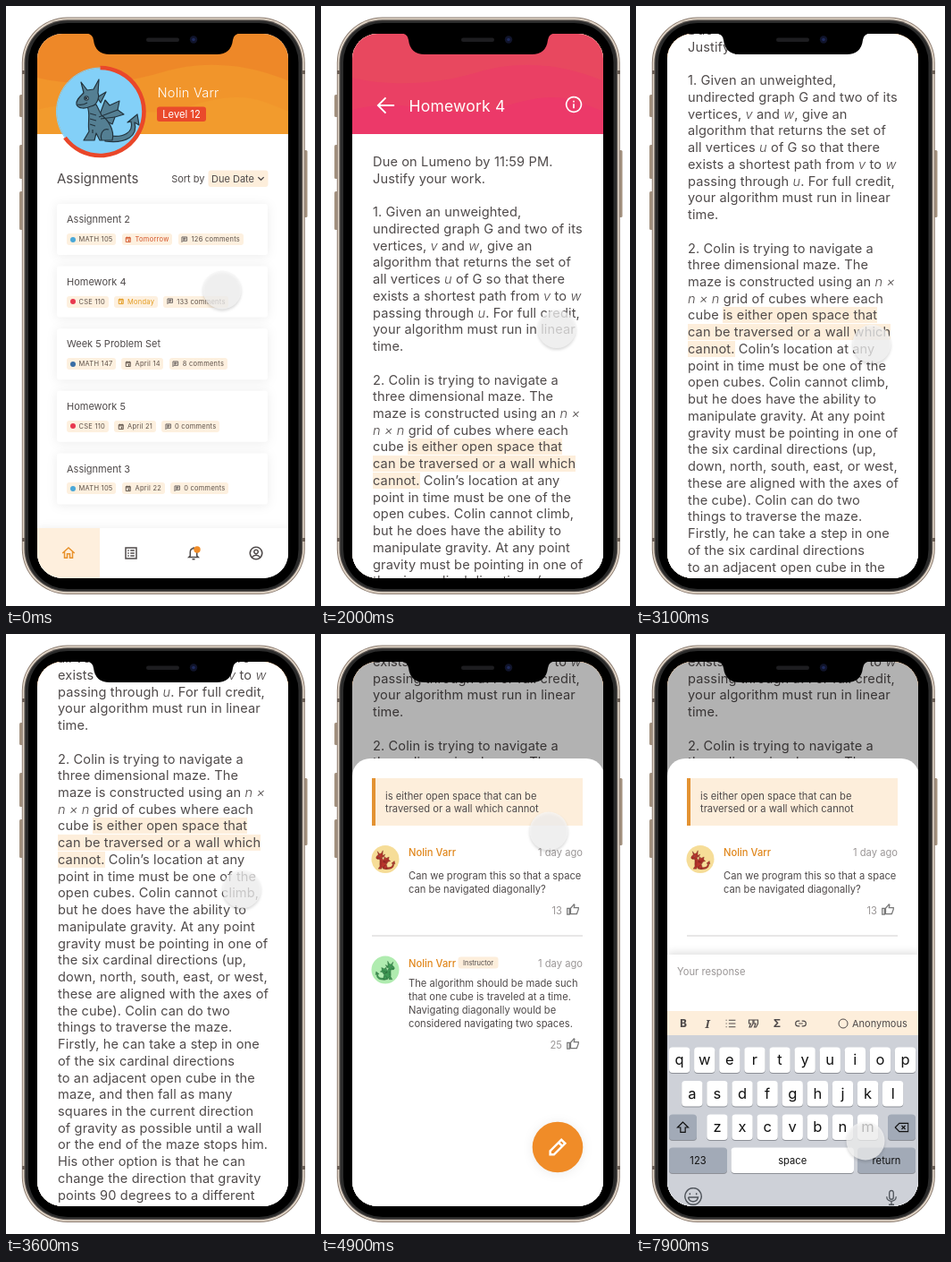
Recreate the animation shown at these times as an HTML page. Size 346x670 px, loop 8000 ms.

```html
<!DOCTYPE html>
<html lang="en">
<head>
<meta charset="utf-8">
<title>Assignments app</title>
<style>
html, body { margin: 0; width: 100%; height: 100%; overflow: hidden; background: #fff; }
body, text { font-family: Inter, Roboto, sans-serif; }
#stage { position: relative; width: 346px; height: 670px; overflow: hidden; }
#stage > *, #screen > *, .art { position: absolute; left: 0; top: 0; width: 346px; height: 670px; }
#screen { clip-path: inset(31px 30px 31px 35px round 28px); background: #fff; }
#page { background: #fff; clip-path: inset(0 0 0 35px); }
#scroll { position: absolute; left: 0; top: 0; }
#body { position: absolute; left: 58px; top: 165px; margin: 0; white-space: pre; letter-spacing: .12px;
  font: 14.6px/18.73px Inter, Roboto, sans-serif; color: #4f4a4a; }
#body i { font-weight: 300; }
#body mark { background: #fdeedb; color: inherit; }
#dim { background: #000; }
.chips { position: absolute; left: 68px; display: flex; gap: 6.5px; }
.chips span { display: flex; align-items: center; gap: 4px; height: 13px; padding: 0 3.5px;
  border-radius: 3px; background: #fdf0df; font-size: 7.5px; letter-spacing: .25px; color: #5c5048; white-space: pre; }
.card { filter: drop-shadow(0 1px 6px #00000014); }
#composer .sheet { filter: drop-shadow(0 -2px 5px #0002); }
#cursor { overflow: visible; filter: drop-shadow(0 2px 1.5px #0003); }
</style>
</head>
<body>
<div id="stage">
  <svg id="phone"></svg>
  <div id="screen">
    <div id="home"></div>
    <div id="page"><div id="scroll">
      <svg id="banner" class="art"></svg>
      <pre id="body">Due on Lumeno by 11:59 PM.
Justify your work.

1. Given an unweighted,
undirected graph G and two of its
vertices, <i>v</i> and <i>w</i>, give an
algorithm that returns the set of
all vertices <i>u</i> of G so that there
exists a shortest path from <i>v</i> to <i>w</i>
passing through <i>u</i>. For full credit,
your algorithm must run in linear
time.

2. Colin is trying to navigate a
three dimensional maze. The
maze is constructed using an <i>n ×</i>
<i>n × n</i> grid of cubes where each
cube <mark>is either open space that</mark>
<mark>can be traversed or a wall which</mark>
<mark>cannot.</mark> Colin’s location at any
point in time must be one of the
open cubes. Colin cannot climb,
but he does have the ability to
manipulate gravity. At any point
gravity must be pointing in one of
the six cardinal directions (up,
down, north, south, east, or west,
these are aligned with the axes of
the cube). Colin can do two
things to traverse the maze.
Firstly, he can take a step in one
of the six cardinal directions
to an adjacent open cube in the
maze, and then fall as many
squares in the current direction
of gravity as possible until a wall
or the end of the maze stops him.
His other option is that he can
change the direction that gravity
points 90 degrees to a different
cardinal direction.</pre>
    </div></div>
    <div id="dim"></div>
    <svg id="sheet"></svg>
    <svg id="composer"></svg>
    <svg id="cursor"><circle r="21.5" fill="#f6f6f6" fill-opacity=".74"/></svg>
  </div>
  <svg id="notch"></svg>
</div>
<script>
const $ = id => document.getElementById(id);
const INK = '#4f4a4a', CREAM = '#fdeedb', ORANGE = '#f08c28', GRAY = '#9b9797';
const USER = 'Nolin Varr';

const text = (x, y, s, size = 11.2, fill = INK, extra = '') =>
  `<text x="${x}" y="${y}" dy=".36em" font-size="${size}" fill="${fill}" ${extra}>${s}</text>`;
const rect = (x, y, w, h, fill, r = 0, extra = '') =>
  `<rect x="${x}" y="${y}" width="${w}" height="${h}" fill="${fill}" rx="${r}" ${extra}/>`;
const disc = (x, y, r, fill, extra = '') => `<circle cx="${x}" cy="${y}" r="${r}" fill="${fill}" ${extra}/>`;
const path = (d, fill, extra = '') => `<path d="${d}" fill="${fill}" ${extra}/>`;
const MID = 'text-anchor="middle"', END = 'text-anchor="end"';

// Line icons on a 24 unit grid
const ICONS = {
  home: 'M3 12L12 4L21 12M6 10V19H10V13H14V19H18V10',
  list: 'M4 4H20V20H4ZM7 8H9M11 8H17M7 12H9M11 12H17M7 16H9M11 16H17',
  bell: 'M5 18H19L17 16V11C17 3 7 3 7 11V16ZM10 21H14M12 3V5',
  user: 'M12 3A9 9 0 1 0 12.1 3M12 7A3 3 0 1 0 12.1 7M6 18C9 14 15 14 18 18',
  date: 'M4 5H20V21H4ZM4 9H20M8 2V5M16 2V5M13 14H16V17H13Z',
  chat: 'M3 3H21V17H7L3 21ZM7 7H17M7 10H17M7 13H14',
  down: 'M5 9L12 16L19 9',
  back: 'M22 12H3M12 3L3 12L12 21',
  info: 'M12 2A10 10 0 1 0 12.1 2M12 11V17M12 7V9',
  like: 'M2 10H6V21H2ZM8 10L14 3L15 4L14 9H22V12L19 20H8Z',
  pen: 'M4 20V16L16 4L20 8L8 20ZM13 7L17 11',
  bullets: 'M8 5H22M8 12H22M8 19H22M2 5H4M2 12H4M2 19H4',
  link: 'M10 7H7A5 5 0 0 0 7 17H10M14 7H17A5 5 0 0 1 17 17H14M8 12H16',
  shift: 'M12 3L3 12H8V20H16V12H21Z',
  erase: 'M8 5H23V19H8L1 12ZM12 9L18 15M18 9L12 15',
  smile: 'M12 2A10 10 0 1 0 12.1 2M6 13H18C17 20 7 20 6 13M8 8V10M16 8V10',
  mic: 'M12 2C8 2 9 6 9 12C9 16 15 16 15 12C15 6 16 2 12 2M5 11C5 20 19 20 19 11M12 18V23M8 23H16'
};
const icon = (name, x, y, size, color, w = 2) =>
  `<svg x="${x - size / 2}" y="${y - size / 2}" width="${size}" height="${size}" viewBox="0 0 24 24">` +
  path(ICONS[name], 'none', `stroke="${color}" stroke-width="${w}"`) + '</svg>';

const dragon = (x, y, scale, color, line, flip = 1) =>
  `<g transform="translate(${x} ${y}) scale(${scale * flip} ${scale}) translate(-36 -36)" stroke="${line}" stroke-width="1.2" stroke-linejoin="round">` +
  path('M34 64C56 69 66 60 63 49L59 50L70 41L72 53L67 50C71 65 58 74 34 71Z', color) +
  path('M27 44L34 25L39 31L50 26L48 36L55 41L45 44L42 52Z', color) +
  path('M14 32C18 40 14 50 16 60L10 70H22L24 62L28 70H42C45 58 37 47 30 42L24 30Z', color) +
  path('M17 40L24 42M17 46L24 48M17 52L23 54M20 58V62M30 70C28 62 32 56 38 58M27 44L48 36M29 46L45 44', 'none') +
  path('M25 22L35 16L29 28Z', color) +
  path('M2 30C1 25 6 21 10 17L7 5L14 14L21 13L27 2L26 17C28 22 25 31 18 32C12 35 4 35 2 30Z', color) +
  path('M3 30C8 31 11 30 14 28', 'none') +
  disc(13, 23, 2.2, '#fff') + disc(12.6, 23, .9, line) + '</g>';

const buttons = [[15, 99, 25], [15, 155, 38], [15, 207, 43], [333.5, 161, 75]];
$('phone').innerHTML =
  buttons.map(([x, y, h]) => rect(x, y, 4, h, '#a3917f', 1.5)).join('') +
  rect(17.8, 12.5, 317, 644.5, '#8c7c70', 51) + rect(18.8, 13.5, 315, 642.5, '#e2d6c8', 50) +
  rect(20.4, 15.2, 311.8, 639, '#5a5451', 48.5) + rect(21.6, 16.6, 309.4, 636.4, '#2b2b2b', 47) +
  rect(25, 19, 302.5, 632, '#000', 44) +
  [72, 594].map(y => rect(18, y, 3, 4, '#6b5f56') + rect(332, y, 3, 4, '#6b5f56')).join('');

$('notch').innerHTML =
  path('M90 30.5Q97 31 98 38Q100 54 116 54H236Q252 54 254 38Q255 31 262 30.5Z', '#000') +
  rect(157, 35.5, 37, 4.5, '#1d1d20', 2.2) + disc(210, 37.5, 4.2, '#10142b') + disc(210, 37.5, 1.8, '#1e2a5c');

const waves = (base, upper, lower) => rect(35, 30, 282, 113, base) +
  path('M35 80C75 90 130 88 175 74S270 64 317 84V143H35Z', upper) +
  path('M35 116C100 98 140 132 205 112S285 106 317 118V143H35Z', lower);

const cards = [
  ['Assignment 2', 'MATH 105', '#4aa8d8', 'Tomorrow', '#d4552a', 126],
  ['Homework 4', 'CSE 110', '#e8384f', 'Monday', '#e39a1c', 133],
  ['Week 5 Problem Set', 'MATH 147', '#3a6ea5', 'April 14', '#5c5048', 8],
  ['Homework 5', 'CSE 110', '#e8384f', 'April 21', '#5c5048', 0],
  ['Assignment 3', 'MATH 105', '#4aa8d8', 'April 22', '#5c5048', 0]
];
const cardY = i => 221 + i * 69.6;
const dot = c => `<svg width="6" height="6">${disc(3, 3, 3, c)}</svg>`;
$('home').innerHTML = '<svg class="art">' +
  waves('#ee8828', '#f1952b', '#f29b2d') +
  disc(105.5, 118, 48.5, '#83d0f8') +
  path('M105.5 69A49 49 0 1 1 66 147', 'none', 'stroke="#e9472a" stroke-width="4.6"') +
  path('M66 147A49 49 0 0 1 105.5 69', 'none', 'stroke="#83d0f8" stroke-width="1"') +
  dragon(113, 116, 1, '#547f93', '#23343e') +
  text(169.5, 96.5, USER, 14.6, '#fff', 'font-weight="300" letter-spacing=".2"') +
  rect(169, 112.5, 55, 16.5, '#ea4a2b', 3) + text(196.5, 121, 'Level 12', 11.2, '#fff', MID) +
  text(57, 193, 'Assignments', 15) + text(222.5, 193, 'Sort by', 11, INK, END) +
  rect(226.5, 183.5, 67, 18.5, CREAM, 3) + text(230, 193, 'Due Date', 11) + icon('down', 285.5, 192.5, 11, INK, 3) +
  cards.map((c, i) => rect(57, cardY(i), 236, 57, '#fff', 3, 'class="card"') + text(68, cardY(i) + 17.3, c[0], 11)).join('') +
  rect(35, 583, 282, 57, '#fff', 0, 'class="card"') + rect(35, 583, 70, 57, '#feefdd') +
  ['home', 'list', 'bell', 'user'].map((n, i) => icon(n, 70 + 70 * i, 611, 18, i ? INK : '#e8912a')).join('') +
  disc(214, 607, 3.7, ORANGE) + '</svg>' +
  cards.map(([, course, color, due, tint, n], i) => `<div class="chips" style="top:${cardY(i) + 33}px">` +
    `<span>${dot(color)}${course}</span>` +
    `<span style="color:${tint}">${icon('date', 0, 0, 7.5, tint, 3)}${due}</span>` +
    `<span>${icon('chat', 0, 0, 7.5, INK, 2.6)}${n} comments</span></div>`).join('');

$('banner').innerHTML = waves('#e8485f', '#ea4064', '#ec3969') +
  icon('back', 72.5, 111, 23, '#fff') + icon('info', 283, 110, 20, '#fff') +
  text(98.5, 111.5, 'Homework 4', 17.5, '#fff', 'letter-spacing=".2"');

const comment = (y, bg, color, line, flip, lines, textY, likes) =>
  disc(72, y + 7.5, 15.5, bg) + dragon(72, y + 8, .3, color, line, flip) +
  text(98, y, USER, 11.2, '#e0861a', 'font-weight="500"') + text(293, y, '1 day ago', 11.2, GRAY, END) +
  lines.map((s, i) => text(98, textY + 15 * i, s)).join('') +
  text(270, textY + 15 * lines.length + 8.5, likes, 11.2, GRAY, END) +
  icon('like', 282, textY + 15 * lines.length + 7.5, 15, '#777');

$('sheet').innerHTML = rect(35, 139, 282, 530, '#fff', 20) +
  rect(57, 161, 236, 53, CREAM) + rect(57, 161, 4, 53, '#e39232') +
  text(72, 180.5, 'is either open space that can be') + text(72, 195, 'traversed or a wall which cannot') +
  comment(244, '#f6dd98', '#b8352c', '#5a1714', 1,
    ['Can we program this so that a space', 'can be navigated diagonally?'], 270, 13) +
  rect(57, 336.5, 236, 1, '#d2d0d0') +
  comment(367.5, '#b0ecb0', '#3f9a55', '#1d4f2b', -1,
    ['The algorithm should be made such', 'that one cube is traveled at a time.',
      'Navigating diagonally would be', 'considered navigating two spaces.'], 390, 25) +
  rect(153.5, 360.5, 45, 13, CREAM, 3) + text(176, 367, 'Instructor', 7.5, INK, MID) +
  disc(265, 573, 28.3, ORANGE, 'class="card"') + icon('pen', 265, 573, 25, '#fff', 2.4);

const key = (x, y, w, label, fill = '#fff', size = 11.2) =>
  rect(x, y + 1, w, 28.5, '#8d9097', 4) + rect(x, y, w, 28.5, fill, 4) +
  text(x + w / 2, y + 14, label, size, '#111', MID);
const row = (letters, x, y) => [...letters].map((c, i) => key(x + 28.1 * i, y, 23.3, c, '#fff', 16.5)).join('');
const DARK = '#a2aab7';
$('composer').innerHTML = rect(35, 358, 282, 300, '#fff', 0, 'class="sheet"') +
  text(46, 376.5, 'Your response', 11.2, GRAY) + rect(35, 421, 282, 27, CREAM) +
  text(53, 435, 'B', 11.5, INK, MID + ' font-weight="800"') +
  text(80, 435, 'I', 12.5, INK, MID + ' font-weight="700" font-style="italic" style="font-family:Noto Serif,serif"') +
  icon('bullets', 106, 435, 13, INK) +
  [128.5, 134].map(x => path(`M${x - 2} 431h4.5v4l-2 4h-2l1.5-4h-2z`, 'none', `stroke="${INK}" stroke-width="1.2"`)).join('') +
  text(158, 435, 'Σ', 12, INK, MID + ' font-weight="700"') + icon('link', 184.5, 435, 14, INK) +
  disc(232, 435, 5, 'none', `stroke="${INK}"`) + text(242, 435, 'Anonymous', 11) +
  rect(35, 448, 282, 210, '#ced1d8') +
  row('qwertyuiop', 37, 461.5) + row('asdfghjkl', 51.2, 499) + row('zxcvbnm', 79.3, 536.5) +
  key(37, 536.5, 31, '', DARK) + icon('shift', 52.5, 551, 16, '#111', 1.8) +
  key(282, 536.5, 31, '', DARK) + icon('erase', 297.5, 551, 16, '#111', 1.8) +
  key(37, 573.5, 65, '123', DARK) + key(106.5, 573.5, 137.5, 'space') + key(248, 573.5, 65, 'return', DARK) +
  icon('smile', 64, 628, 22, '#50555c', 1.6) + icon('mic', 286, 629, 18, '#50555c', 1.8);

// Key points: [time, value, ...]
const scrollKeys = [[2320, 0], [2850, 147], [3200, 147], [3700, 293]];
const cursorKeys = [
  [0, 242, 317], [500, 263, 317], [1500, 263, 317], [2100, 264, 364], [2320, 264, 364],
  [2850, 264, 217], [3200, 264, 416], [3700, 264, 270], [4250, 255, 220], [5600, 255, 220],
  [6300, 174, 403], [6450, 174, 403], [7100, 265, 573], [7500, 265, 573], [7900, 257, 566]
];
const at = (keys, t, k = 1) => {
  const i = keys.findIndex(p => p[0] > t);
  if (i === 0) return keys[0][k];
  if (i < 0) return keys[keys.length - 1][k];
  const a = keys[i - 1], b = keys[i], u = (t - a[0]) / (b[0] - a[0]);
  return a[k] + (b[k] - a[k]) * u * u * (3 - 2 * u);
};
const easeOut = (t, start, length) => {
  const u = Math.min(1, Math.max(0, (t - start) / length));
  return 1 - (1 - u) ** 2;
};
const move = (id, x, y) => { $(id).style.transform = `translate(${x}px, ${y}px)`; };

function draw() {
  const t = performance.now() % 8000;
  const up = easeOut(t, 4450, 400);
  move('page', 281 * (1 - easeOut(t, 1100, 280)), 0);
  move('scroll', 0, -at(scrollKeys, t));
  move('sheet', 0, 501 * (1 - up));
  $('dim').style.opacity = .3 * up;
  move('composer', 0, 295 * (1 - easeOut(t, 7300, 400)));
  move('cursor', at(cursorKeys, t), at(cursorKeys, t, 2));
  requestAnimationFrame(draw);
}
draw();
</script>
</body>
</html>
```
